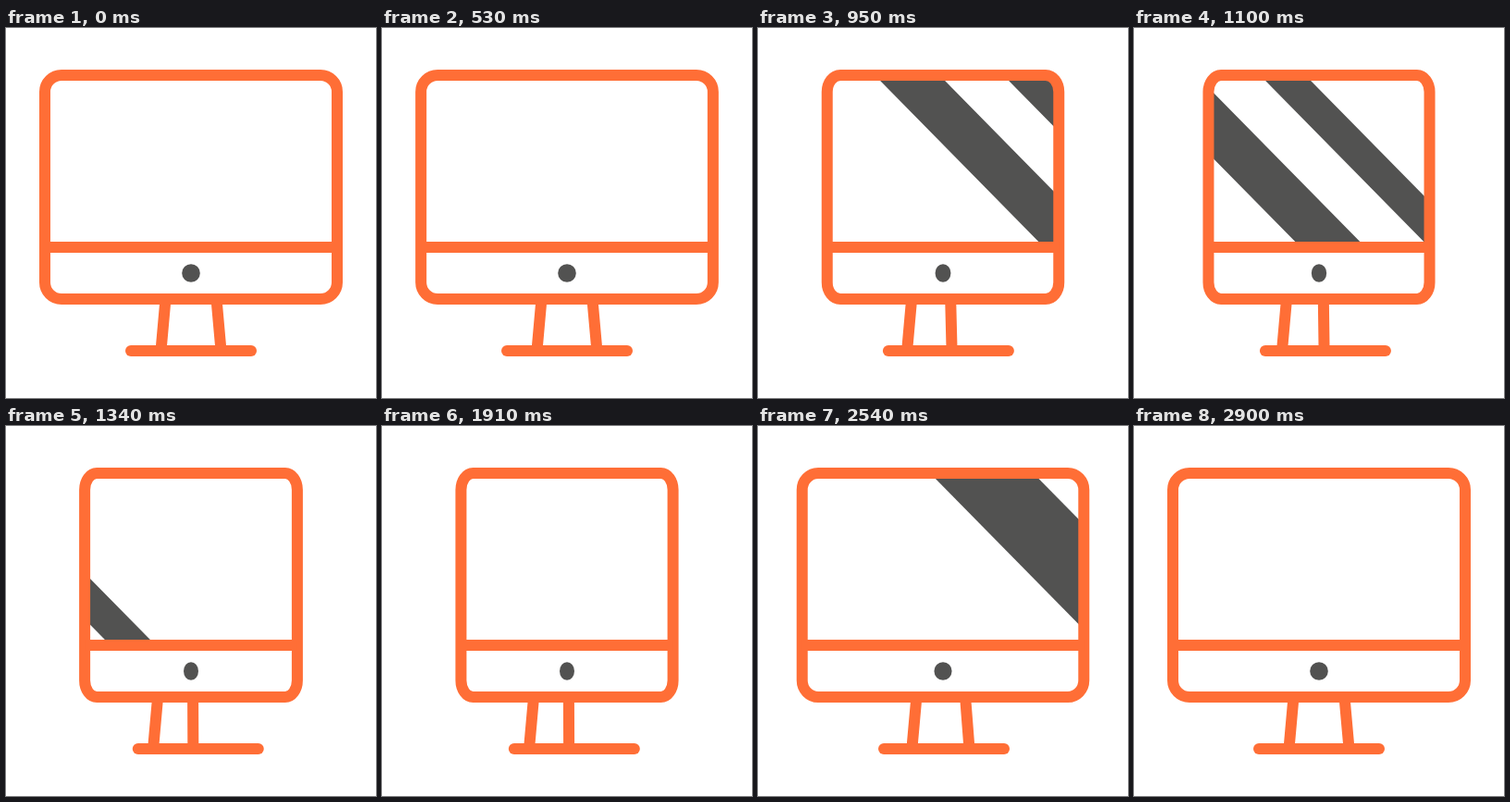
An HTML page that plays this animation: 400x400 px, repeating every 2.93 s.

```html
<!DOCTYPE html>
<html lang="en">
<head>
<meta charset="utf-8">
<title>Turning monitor</title>
<style>
  html, body { margin: 0; height: 100%; overflow: hidden; background: #fff; }
  svg { display: block; width: 100vw; height: 100vh; }
</style>
</head>
<body>
<svg viewBox="0 0 400 400">
  <clipPath id="clip"><use href="#body"/></clipPath>
  <path id="glare" fill="#525251" clip-path="url(#clip)"/>
  <g fill="none" stroke="#ff6e36" stroke-width="12">
    <path id="legs"/>
    <path id="base" stroke-linecap="round"/>
    <rect id="body" y="51" height="242" ry="18"/>
    <path id="divider"/>
  </g>
  <ellipse id="dot" cx="200" cy="265" ry="9.8" fill="#525251"/>
</svg>
<script>
const LOOP = 2930, STEP = 30, START = 500, TURN = 1700, END = 2900;
const MAX_TURN = 45; // pixels each side moves inwards
const $ = id => document.getElementById(id);
const set = (id, attrs) => {
  for (const key in attrs) $(id).setAttribute(key, attrs[key]);
};

// Cubic easing with control points (x1, 0) and (x2, 1)
function ease(x, x1, x2) {
  if (x <= 0) return 0;
  if (x >= 1) return 1;
  let lo = 0, hi = 1, u;
  for (let i = 0; i < 24; i++) {
    u = (lo + hi) / 2;
    const at = 3 * x1 * u * (1 - u) ** 2 + 3 * x2 * u * u * (1 - u) + u ** 3;
    if (at < x) lo = u; else hi = u;
  }
  return u * u * (3 - 2 * u);
}

// Diagonal band; a and b are its edges at the top of the screen
const band = (a, b) => `M${a - 6} 51H${b - 6}L${b + 177} 237H${a + 177}z`;

function glare(t) {
  if (t < TURN) {
    const x = 287 - 0.86 * (t - 770);
    return band(x, x + 70) + band(x + 139, x + 188);
  }
  const dt = t - 2270;
  return band(-51 + 0.9 * dt, 93 + 0.78 * dt);
}

function draw(t) {
  const turn = t < TURN
    ? ease((t - START) / (TURN - START), 0.285, 0.057)
    : 1 - ease((t - TURN) / (END - TURN), 0.6, 0.4);
  const d = MAX_TURN * turn, half = 158 - d;
  const left = -0.195 * d, shift = 0.18 * d;

  set('body', { x: 200 - half, width: 2 * half, rx: 18 * half / 158 });
  set('divider', { d: `M${200 - half} 237H${200 + half}` });
  set('legs', {
    d: `M${172.5 + left} 293L${167.5 + left} 349` +
       `M${227.5 - 0.59 * d} 293L${232.5 - 0.7 * d} 349`
  });
  set('base', { d: `M${135 + shift} 349H${265 + shift}` });
  set('dot', { rx: 9.8 - 0.042 * d });
  set('glare', { d: glare(t) });
}

const origin = performance.now();
function tick() {
  const t = (performance.now() - origin) % LOOP;
  draw(Math.max(0, Math.floor((t - 20) / STEP) * STEP + 20));
  requestAnimationFrame(tick);
}
tick();
</script>
</body>
</html>
```
